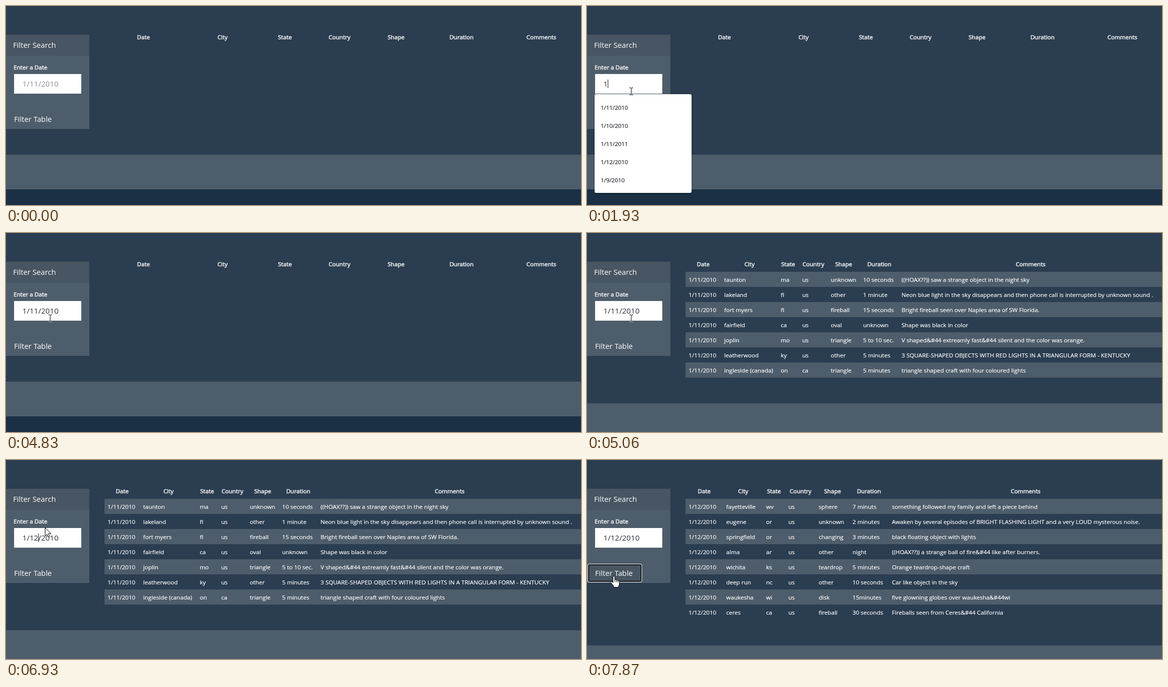
Recreate the animation shown at these times as an HTML page. Size 1138 by 395 pixels, loop 8 s.

```html
<!DOCTYPE html>
<html lang="en">
<head>
<meta charset="utf-8">
<title>Filter table</title>
<style>
  html, body { margin: 0; width: 100%; height: 100%; overflow: hidden; background: #2b3d50; }
  svg { display: block; width: 1138px; height: 395px; }
  text { font: 11.6px "Open Sans", "Noto Sans", sans-serif; white-space: pre; }
  .head { fill: #ebebeb; stroke: #ebebeb; stroke-width: .6px; }
  .mid { text-anchor: middle; }
  .cell { fill: #fff; stroke: #fff; stroke-width: .2px; }
  .option { fill: #1c1c24; stroke: #1c1c24; stroke-width: .15px; letter-spacing: -.1px; }
  .title { font-size: 14.75px; fill: #fff; }
  .value { font-size: 15px; letter-spacing: .05px; fill: #2b3038; }
  .value.hint { fill: #8d9197; }
  #list rect { fill: #fff; filter: drop-shadow(0 1px 1.5px rgba(0, 0, 0, .6)); }
  #beam { mix-blend-mode: difference; }
</style>
</head>
<body>
<svg viewBox="0 0 1138 395">
  <rect width="1138" height="395" fill="#2b3d50"/>
  <g id="tables"></g>

  <rect y="57" width="165" height="187" fill="#4e5d6b"/>
  <rect y="57" width="165" height="42" fill="#485562"/>
  <text class="title" x="14" y="83">Filter Search</text>
  <text class="head" x="15" y="126">Enter a Date</text>
  <rect x="16" y="135" width="133" height="39" fill="#fff"/>
  <text class="value" id="value" x="32.5" y="160"></text>
  <rect id="caret" y="146" width="1" height="17" fill="#111"/>
  <g id="ring">
    <rect x="1" y="206" width="108" height="37" rx="4" fill="#fff"/>
    <rect x="2" y="207" width="106" height="35" rx="3" fill="#101418"/>
    <rect x="4" y="209" width="102" height="31" rx="1" fill="#485562"/>
  </g>
  <text class="title" x="16" y="230">Filter Table</text>
  <g id="list"></g>

  <g id="arrow">
    <path d="M.5.5V17L4.3 13.4 6.8 19 9.3 17.9 6.9 12.4H12Z" fill="#fff" stroke="#000"/>
  </g>
  <g id="hand">
    <path d="M-1.5 1.5C-1.5-.7 2-.7 2 1.5V7C2.600 5.800 5 6.100 5.200 7.800 6 6.900 8 7.200 8.200 8.800 9.200 8 11 8.600 11 10.500V15C11 17.500 9.200 18.500 9 21.500H.5C.3 19.500-3 16.500-5.300 12.500-6.300 10.500-4 9.500-2.700 11L-1.500 12.500Z" fill="#fff" stroke="#000"/>
    <path d="M2 7v4M5.200 8v3.500M8.200 9v3" fill="none" stroke="#000"/>
  </g>
  <path id="beam" d="M-3-6.500H0M1-6.500H4M.5-6V7M-3 7.500H0M1 7.500H4" fill="none" stroke="#fff"/>
</svg>
<script>
const LOOP = 8000;
const $ = id => document.getElementById(id);

function add(parent, tag, attrs, content) {
  const el = document.createElementNS('http://www.w3.org/2000/svg', tag);
  for (const k in attrs) el.setAttribute(k, attrs[k]);
  if (content) el.textContent = content;
  parent.append(el);
  return el;
}

const titles = ['Date', 'City', 'State', 'Country', 'Shape', 'Duration', 'Comments'];

const tables = [
  { from: 0, band: 295, mids: [272, 428.5, 552, 660, 772, 901.5, 1059.5], cols: [], rows: [] },
  { from: 5060, band: 338, date: '1/11/2010',
    mids: [230, 321.5, 398, 448, 508, 578.5, 878],
    cols: [201, 271.5, 383.5, 426, 482.5, 546.5, 622.5],
    rows: [
      'taunton|ma|us|unknown|10 seconds|((HOAX??)) saw a strange object in the night sky',
      'lakeland|fl|us|other|1 minute|Neon blue light in the sky disappears and then phone call is interrupted by unknown sound .',
      'fort myers|fl|us|fireball|15 seconds|Bright fireball seen over Naples area of SW Florida.',
      'fairfield|ca|us|oval|unknown|Shape was black in color',
      'joplin|mo|us|triangle|5 to 10 sec.|V shaped&#44 extreamly fast&#44 silent and the color was orange.',
      'leatherwood|ky|us|other|5 minutes|3 SQUARE-SHAPED OBJECTS WITH RED LIGHTS IN A TRIANGULAR FORM - KENTUCKY',
      'ingleside (canada)|on|ca|triangle|5 minutes|triangle shaped craft with four coloured lights'
    ] },
  { from: 7810, band: 368, date: '1/12/2010',
    mids: [232, 309, 370, 422.5, 486, 558, 868],
    cols: [201, 275.5, 354.5, 398.5, 458.5, 525.5, 603.5],
    rows: [
      'fayetteville|wv|us|sphere|7 minuts|something followed my family and left a piece behind',
      'eugene|or|us|unknown|2 minutes|Awaken by several episodes of BRIGHT FLASHING LIGHT and a very LOUD mysterous noise.',
      'springfield|or|us|changing|3 minutes|black floating object with lights',
      'alma|ar|us|other|night|((HOAX??)) a strange ball of fire&#44 like after burners.',
      'wichita|ks|us|teardrop|5 minutes|Orange teardrop-shape craft',
      'deep run|nc|us|other|10 seconds|Car like object in the sky',
      'waukesha|wi|us|disk|15minutes|five glowning globes over waukesha&#44wi',
      'ceres|ca|us|fireball|30 seconds|Fireballs seen from Ceres&#44 California'
    ] }
];

for (const t of tables) {
  t.el = add($('tables'), 'g');
  titles.forEach((s, i) => add(t.el, 'text', { class: 'head mid', x: t.mids[i], y: 66 }, s));
  t.rows.forEach((row, r) => {
    const y = 77 + 30 * r;
    if (r % 2 === 0) add(t.el, 'rect', { x: 195, y, width: 943, height: 30, fill: '#4e5d6b' });
    [t.date, ...row.split('|')].forEach((s, i) =>
      add(t.el, 'text', { class: 'cell', x: t.cols[i], y: y + 20 }, s));
  });
  add(t.el, 'rect', { y: t.band, width: 1138, height: 69, fill: '#4e5d6b' });
  add(t.el, 'rect', { y: t.band + 69, width: 1138, height: 200, fill: '#1b3045' });
}

// time, typed text, caret index (-1 = hidden)
const typing = [
  [0, '', -1], [1240, '', 0], [1620, '', -1],
  [1930, '1', 1], [2230, '1/', 2], [2480, '1/1', 3], [2710, '1/11', 4],
  [3190, '1/11/', 5], [3420, '1/11/2', 6], [3650, '1/11/20', 7],
  [4130, '1/11/201', 8], [4280, '1/11/2010', 9], [4830, '1/11/2010', -1],
  [5360, '1/11/2010', 9], [5930, '1/11/2010', -1], [6330, '1/11/2010', 9],
  [6480, '1/11/2010', 4], [6790, '1/1/2010', 3], [6930, '1/12/2010', 4],
  [7410, '1/12/2010', -1]
];

const history = ['1/11/2010', '1/10/2010', '1/11/2011', '1/12/2010', '1/9/2010'];

// time, x, y of the pointer's hot spot
const moves = [[0, -50, -50]];
for (let k = 0; k <= 10; k++) {
  const p = k / 10, e = p * p * (3 - 2 * p);
  moves.push([290 + 79 * k, 1062 - 988 * e, 386 - 225 * e]);
}
moves.push(
  [1160, 82, 167], [1240, 87, 169],
  [5930, 84, 167], [6000, 75, 162], [6080, 64, 156], [6150, 56, 152],
  [6330, 54, 149], [6410, 53, 146], [6480, 60, 146], [6630, 74, 146],
  [6790, 76, 130], [6860, 77, 132], [6930, 77, 134], [7010, 74, 146],
  [7090, 66, 165], [7170, 56, 188], [7250, 45, 208], [7330, 35, 224],
  [7410, 28, 233], [7560, 42, 234], [7640, 53, 231]
);

const at = (steps, t) => steps.findLast(s => s[0] <= t);
const show = (el, on) => el.setAttribute('visibility', on ? 'visible' : 'hidden');

function drawField(t) {
  const [, text, pos] = at(typing, t);
  const value = $('value');
  value.textContent = text || '1/11/2010';
  value.classList.toggle('hint', !text);
  show($('caret'), pos >= 0);
  const w = pos > 0 ? value.getSubStringLength(0, pos) : 0;
  $('caret').setAttribute('x', Math.floor(33.3 + w));

  const list = $('list');
  list.replaceChildren();
  if (t < 1930 || t >= 4280) return;
  const found = history.filter(s => s.startsWith(text));
  add(list, 'rect', { x: 15, y: 175, width: 192, height: 16 + 36 * found.length, rx: 3 });
  found.forEach((s, i) => add(list, 'text', { class: 'option', x: 27, y: 206 + 36 * i }, s));
}

function drawPointer(t) {
  const [, x, y] = at(moves, t).map(Math.round);
  const inField = x >= 16 && x < 149 && y >= 135 && y < 174;
  const onButton = x >= 1 && x < 109 && y >= 206 && y < 243;
  const kind = inField ? 'beam' : onButton ? 'hand' : 'arrow';
  for (const id of ['arrow', 'hand', 'beam']) show($(id), id === kind);
  $(kind).setAttribute('transform', `translate(${x} ${y})`);
}

function frame() {
  const t = performance.now() % LOOP;
  const current = tables.findLast(s => s.from <= t);
  for (const s of tables) show(s.el, s === current);
  show($('ring'), t >= 7560);
  drawField(t);
  drawPointer(t);
  requestAnimationFrame(frame);
}
frame();
</script>
</body>
</html>
```
